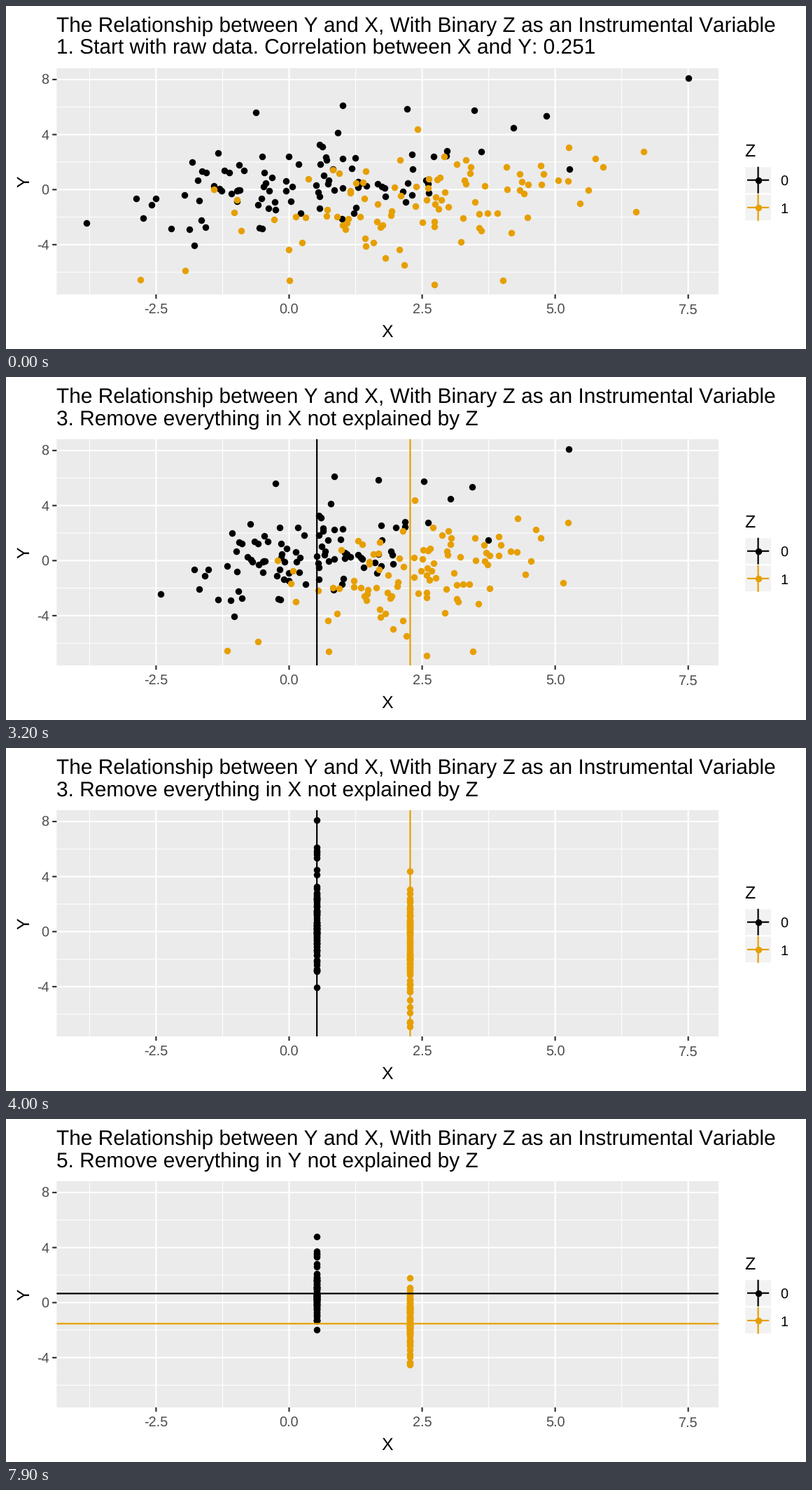
Animation of 1143 by 490 pixels, one loop 8000 ms. Source, as a matplotlib script:

```python
import numpy as np
import matplotlib.pyplot as plt
from matplotlib.animation import FuncAnimation
from matplotlib.patches import Rectangle

W, H, DPI = 1143, 490, 100
PT = 72 / DPI
STEP, FRAMES = 100, 80
COLORS = ("#000000", "#E69F00")
X_MEAN, Y_MEAN = (0.522, 2.275), (0.66, -1.53)
LEFT, RIGHT, TOP, BOTTOM = 72.4, 1018, 88.8, 412

HEADING = "The Relationship between Y and X, With Binary Z as an Instrumental Variable"
STEPS = [
    (0, "1. Start with raw data. Correlation between X and Y: 0.251"),
    (500, "2. Figure out what differences in X are explained by Z"),
    (2800, "3. Remove everything in X not explained by Z"),
    (5100, "4. Figure out what differences in Y are explained by Z"),
    (7400, "5. Remove everything in Y not explained by Z"),
]

plt.rcParams.update({
    "font.family": "Liberation Sans",
    "text.hinting": "none",
    "text.kerning_factor": 6,
    "path.snap": False,
    "lines.solid_capstyle": "butt",
})


def sx(x):
    return 404.5 + 76.03 * np.asarray(x)


def sy(y):
    return 262.3 - 19.66 * np.asarray(y)


def cloud(extremes, center, sd, rho, seed, n=100):
    """Tilted normal cloud whose outermost ranks are the given extremes."""
    rng = np.random.default_rng(seed)
    rank = np.arange(n - len(extremes)) + 0.5
    r = np.sqrt(-2 * np.log(1 - rank / n))
    a = rng.uniform(0, 2 * np.pi, rank.size)
    u, v = r * np.cos(a), r * np.sin(a)
    core = np.column_stack([u, rho * u + np.sqrt(1 - rho ** 2) * v])
    return np.vstack([extremes, np.array(center) + core * sd])


CLOUDS = (
    cloud([(7.50, 8.08), (1.01, 6.14), (2.22, 5.84), (3.48, 5.76),
           (-0.62, 5.59), (4.83, 5.38), (4.22, 4.47), (5.27, 1.49),
           (-1.78, -4.05), (-3.81, -2.43)],
          center=(0.35, 0.35), sd=(1.7, 1.8), rho=0.3, seed=4),
    cloud([(6.66, 2.74), (5.25, 3.09), (2.41, 4.39), (6.52, -1.59),
           (4.02, -6.62), (2.73, -6.88), (0.01, -6.60), (-1.95, -5.88),
           (-2.80, -6.55), (-1.41, 0.00)],
          center=(2.25, -1.4), sd=(1.85, 2.25), rho=0.45, seed=11),
)

fig = plt.figure(figsize=(W / DPI, H / DPI), dpi=DPI, facecolor="white")
ax = fig.add_axes([0, 0, 1, 1])
ax.set(xlim=(0, W), ylim=(H, 0))
ax.axis("off")


def line(x0, y0, x1, y1, color, width=2.2, z=2):
    return ax.plot([x0, x1], [y0, y1], color=color, lw=width * PT, zorder=z)[0]


def box(x0, y0, x1, y1, color):
    ax.add_patch(Rectangle((x0, y0), x1 - x0, y1 - y0, fc=color, lw=0, zorder=1))


def label(x, y, s, size, color="black", **kw):
    return ax.text(x, y, s, fontsize=size * PT, color=color,
                   va="baseline", **kw)


def dots(x, y, color, z):
    return ax.plot(x, y, "o", ms=9.5 * PT, mew=0, color=color, zorder=z)[0]


# Panel, grid and axes
box(LEFT, TOP, RIGHT, BOTTOM, "#EBEBEB")
for x in np.arange(-3.75, 7.6, 1.25):
    major = x % 2.5 == 0
    line(sx(x), TOP, sx(x), BOTTOM, "white", 2.2 if major else 1.1)
    if major:
        line(sx(x), BOTTOM, sx(x), BOTTOM + 6.2, "#333333")
        label(sx(x), 440, f"{x:.1f}", 19.9, "#4D4D4D", ha="center")
for y in range(-6, 9, 2):
    major = y % 4 == 0
    line(LEFT, sy(y), RIGHT, sy(y), "white", 2.2 if major else 1.1)
    if major:
        line(LEFT - 6.2, sy(y), LEFT, sy(y), "#333333")
        label(61.3, sy(y) + 7.1, f"{y}", 19.9, "#4D4D4D", ha="right")
label(545.2, 473, "X", 24.9, ha="center")
label(33, 250.5, "Y", 24.9, ha="center", rotation=90, rotation_mode="anchor")

# Legend
label(1055, 215, "Z", 24.9)
for i, color in enumerate(COLORS):
    cy = 248.7 + 39.2 * i
    box(1056.2, cy - 18.4, 1093, cy + 18.4, "#F2F2F2")
    line(1074.6, cy - 19, 1074.6, cy + 19, color, z=3)
    line(1059, cy, 1090.2, cy, color, z=3)
    dots([1074.6], [cy], color, 4)
    label(1106.3, cy + 7.6, str(i), 19.9)

label(72.4, 36.4, HEADING, 29.9)
subtitle = label(72.4, 68.7, "", 29.9)

points = [dots([], [], c, 5 + i) for i, c in enumerate(COLORS)]
v_lines = [line(sx(m), TOP, sx(m), BOTTOM, c, z=8)
           for m, c in zip(X_MEAN, COLORS)]
h_lines = [line(LEFT, sy(m), RIGHT, sy(m), c, z=8)
           for m, c in zip(Y_MEAN, COLORS)]


def ease(t, start, length=1300):
    """Sine in-out from 0 to 1."""
    u = np.clip((t - start) / length, 0, 1)
    return (1 - np.cos(np.pi * u)) / 2


def draw(frame):
    t = frame * STEP
    subtitle.set_text([s for start, s in STEPS if t >= start][-1])
    px, py = ease(t, 2700), ease(t, 7300)
    for dot, data, mx, my in zip(points, CLOUDS, X_MEAN, Y_MEAN):
        x, y = data.T
        dot.set_data(sx(x + (mx - x) * px), sy(y + (my - y) * py))
    for ln in v_lines:
        ln.set_visible(900 <= t < 5100)
    for ln in h_lines:
        ln.set_visible(t >= 5500)
    return [subtitle, *points, *v_lines, *h_lines]


anim = FuncAnimation(fig, draw, frames=FRAMES, interval=STEP,
                     repeat=True, repeat_delay=0)
plt.show()
```
